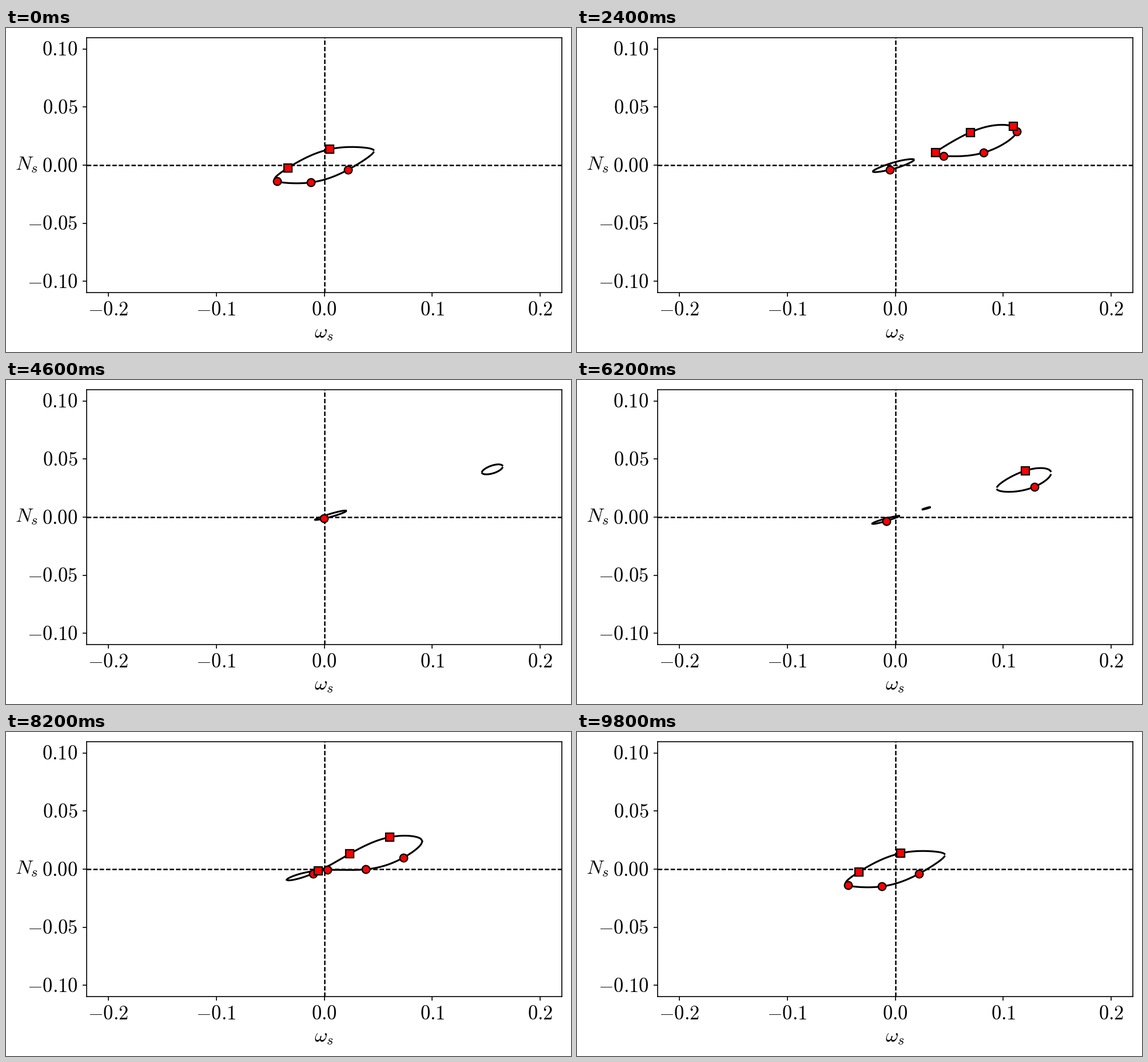
A matplotlib script for the animation above (9.9 s loop, 988 by 567 pixels).

```python
import numpy as np
import matplotlib.pyplot as plt
from matplotlib.animation import FuncAnimation

plt.rcParams["mathtext.fontset"] = "cm"

W, H, DPI = 988, 567, 150
LEFT, RIGHT, TOP, BOTTOM = 140.8, 972.2, 16.6, 463.4
FRAMES, INTERVAL = 99, 100
HALF = (FRAMES - 1) // 2

# Laser with delayed feedback through a sinc-shaped filter
ALPHA = 3.5
K = 1 + ALPHA**2
GAIN = 0.1658 / np.sqrt(K)
WIDTH = 0.06                  # distance from filter centre to first zero
FILTER_DELAY = np.pi / WIDTH
DELAY = 173.5 - FILTER_DELAY
PHASE = 0.99
MAX_DETUNING = 0.173

CURVE_W = np.arange(-0.0999, 0.2, 0.00075)
FINE_W = np.linspace(-0.1, 0.2, 20001)


def detuning(i):
    return MAX_DETUNING * min(i, FRAMES - 1 - i) / HALF


def amplitude(w, d):
    return GAIN * np.sinc((w - d) / WIDTH)


def phase(w, d):
    return PHASE + DELAY * w + FILTER_DELAY * (w - d)


def branches(d):
    """Lower and upper carrier branches over frequency, NaN where absent."""
    disc = K * amplitude(CURVE_W, d) ** 2 - CURVE_W**2
    root = np.sqrt(np.where(disc >= 0, disc, np.nan))
    return (ALPHA * CURVE_W - root) / K, (ALPHA * CURVE_W + root) / K


def modes(d):
    """Solutions of the phase condition, split by the slope at the root."""
    psi = phase(FINE_W, d)
    g = FINE_W + amplitude(FINE_W, d) * (ALPHA * np.cos(psi) + np.sin(psi))
    k = np.nonzero(g[:-1] * g[1:] < 0)[0]
    step = FINE_W[1] - FINE_W[0]
    w = FINE_W[k] - g[k] * step / (g[k + 1] - g[k])
    n = -amplitude(w, d) * np.cos(phase(w, d))
    rising = g[k + 1] > g[k]
    return (w[rising], n[rising]), (w[~rising], n[~rising])


fig = plt.figure(figsize=(W / DPI, H / DPI), dpi=DPI, facecolor="white")
ax = fig.add_axes([LEFT / W, 1 - BOTTOM / H,
                   (RIGHT - LEFT) / W, (BOTTOM - TOP) / H])
ax.set_xlim(-0.22, 0.22)
ax.set_ylim(-0.11, 0.11)
ax.set_xticks([-0.2, -0.1, 0, 0.1, 0.2])
ax.set_yticks([-0.1, -0.05, 0, 0.05, 0.1])
ax.tick_params(labelbottom=False, labelleft=False)


def label(x, y, s, ha="center"):
    fig.text(x / W, 1 - y / H, f"${s}$", fontsize=16.6, ha=ha, va="baseline")


for v in ax.get_xticks():
    x = LEFT + (v + 0.22) / 0.44 * (RIGHT - LEFT)
    label(x, 503, f"{v:.1f}")
for v in ax.get_yticks():
    y = BOTTOM - (v + 0.11) / 0.22 * (BOTTOM - TOP)
    label(125.5, y + 11.5, f"{v:.2f}", "right")
label(556, 542, r"\omega_s")
label(16.5, 248, "N_s", "left")

guide = dict(color="black", lw=1.2, ls=(0, (3.1, 1.35)))
ax.axhline(0, **guide)
ax.axvline(0, **guide)
lower, = ax.plot([], [], color="black", lw=1.5)
upper, = ax.plot([], [], color="black", lw=1.5)
dots = dict(ls="none", ms=6.5, mfc="red", mec="black", mew=1.1)
circles, = ax.plot([], [], "o", **dots)
squares, = ax.plot([], [], "s", **dots)


def draw(i):
    d = detuning(i)
    low, high = branches(d)
    lower.set_data(CURVE_W, low)
    upper.set_data(CURVE_W, high)
    stable, saddle = modes(d)
    circles.set_data(*stable)
    squares.set_data(*saddle)
    return lower, upper, circles, squares


anim = FuncAnimation(fig, draw, frames=FRAMES, interval=INTERVAL,
                     repeat=True, repeat_delay=0, blit=False)
plt.show()
```
